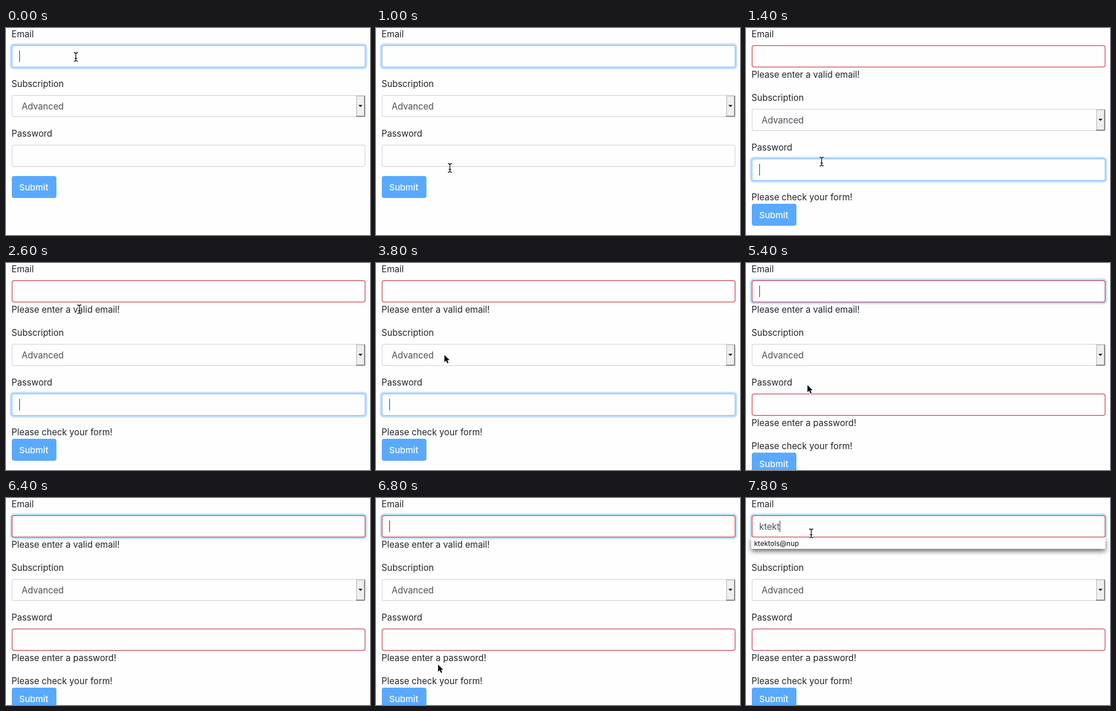
These frames come from a looping animation (628 px wide and 358 px high, 8000 ms). An HTML page with a canvas:

```html
<!DOCTYPE html>
<html lang="en">
<head>
<meta charset="utf-8">
<title>Form validation</title>
<style>
  html, body { margin: 0; width: 100%; height: 100%; overflow: hidden; background: #fefefe; }
  canvas { display: block; width: 628px; height: 358px; }
</style>
</head>
<body>
<canvas id="stage"></canvas>
<script>
const W = 628, H = 358, LOOP = 8000, STEP = 200;
const canvas = document.getElementById('stage');
const ctx = canvas.getContext('2d');
const ratio = window.devicePixelRatio || 1;
canvas.width = W * ratio;
canvas.height = H * ratio;

const FAMILY = 'Inter, "Open Sans", sans-serif';
const BODY = '15.2px ' + FAMILY;
const INK = '#212529', FIELD_INK = '#495057';
const GREY = '#cdd0d3', RED = '#bd2430', FOCUS = '#80bdff';

const EMAIL_BLUR = 1200, PASSWORD_BLUR = 4200, POPUP = 7200;
const TYPED = 'ktekt', SUGGESTION = 'ktektols@nup';
const KEYS = [7000, 7200, 7200, 7400, 7600];

// Pointer path: time, x, y
const PATH = [
  [0, 120, 50], [200, 120, 50], [1000, 127, 242], [1400, 130, 231], [2000, 130, 231],
  [2600, 126, 80], [2800, 124, 78], [3300, 112, 284], [3800, 118, 159],
  [4200, 116, 57], [4400, 115, 55], [5000, 115, 57], [5800, 96, 364], [6400, 96, 370],
  [6600, 104, 336], [7200, 116, 150], [7600, 112, 68], [7800, 112, 61], [8000, 112, 61]
];

const clamp = v => Math.max(0, Math.min(1, v));

function pointerAt(t) {
  let i = 0;
  while (i < PATH.length - 2 && t >= PATH[i + 1][0]) i++;
  const [t0, x0, y0] = PATH[i], [t1, x1, y1] = PATH[i + 1];
  let k = clamp((t - t0) / (t1 - t0));
  k = k * k * (3 - 2 * k);
  return [Math.round(x0 + (x1 - x0) * k), Math.round(y0 + (y1 - y0) * k)];
}

function text(str, x, y, color = INK, font = BODY) {
  ctx.font = font;
  ctx.fillStyle = color;
  ctx.fillText(str, x, y);
}

function roundBox(x, y, w, h, r, fill) {
  ctx.beginPath();
  ctx.roundRect(x, y, w, h, r);
  ctx.fillStyle = fill;
  ctx.fill();
}

function field(y, border, glow = 0) {
  if (glow > 0) {
    ctx.globalAlpha = glow;
    roundBox(6.8, y - 3.2, 616.4, 44.4, 7, '#bfdeff');
    ctx.globalAlpha = 1;
  }
  roundBox(10, y, 610, 38, 4, border);
  roundBox(11, y + 1, 608, 36, 3, '#fefefe');
}

function select(y) {
  field(y, GREY);
  text('Advanced', 27, y + 24.5, FIELD_INK);
  ctx.fillStyle = '#777';
  ctx.fillRect(604, y + 1, 15.5, 36.5);
  ctx.fillStyle = '#c9c9c9';
  ctx.fillRect(604, y + 1, 14, 35);
  ctx.fillStyle = '#efefef';
  ctx.fillRect(605.5, y + 2.5, 12, 33);
  ctx.fillStyle = '#111';
  ctx.beginPath();
  ctx.moveTo(608, y + 17);
  ctx.lineTo(615, y + 17);
  ctx.lineTo(611.5, y + 20.7);
  ctx.fill();
}

function button(y) {
  roundBox(10, y, 77, 38, 4, '#59a9ff');
  text('Submit', 22.8, y + 24.5, '#fff', '500 15px ' + FAMILY);
}

function caret(x, y, age) {
  if (age % 1134 >= 567) return;
  ctx.fillStyle = '#333';
  ctx.fillRect(x, y + 9, 1, 20);
}

function popup() {
  ctx.save();
  ctx.shadowColor = 'rgba(0,0,0,.6)';
  ctx.shadowBlur = 9 * ratio;
  ctx.shadowOffsetY = 4 * ratio;
  ctx.beginPath();
  ctx.rect(0, 68, W, 60);
  ctx.clip();
  ctx.fillStyle = '#fefefe';
  ctx.fillRect(9, 68, 611, 20);
  ctx.restore();
  text(SUGGESTION, 14, 83, '#111', '12px ' + FAMILY);
}

function beam(x, y) {
  ctx.beginPath();
  ctx.moveTo(x - 3, y - 7.5);
  ctx.quadraticCurveTo(x + .5, y - 7.5, x + .5, y - 5);
  ctx.quadraticCurveTo(x + .5, y - 7.5, x + 4, y - 7.5);
  ctx.moveTo(x + .5, y - 5);
  ctx.lineTo(x + .5, y + 5.5);
  ctx.moveTo(x - 3, y + 7.5);
  ctx.quadraticCurveTo(x + .5, y + 7.5, x + .5, y + 5);
  ctx.quadraticCurveTo(x + .5, y + 7.5, x + 4, y + 7.5);
  ctx.moveTo(x - 1.5, y + 2.5);
  ctx.lineTo(x + 2.5, y + 2.5);
  ctx.strokeStyle = '#fff';
  ctx.lineWidth = 3;
  ctx.stroke();
  ctx.strokeStyle = '#111';
  ctx.lineWidth = 1.3;
  ctx.stroke();
}

function arrow(x, y) {
  ctx.beginPath();
  [[0, 0], [0, 12.5], [2.9, 9.8], [5, 14.6], [7.2, 13.6], [5.1, 9], [9, 9]]
    .forEach(([dx, dy]) => ctx.lineTo(x + dx, y + dy));
  ctx.closePath();
  ctx.strokeStyle = '#fff';
  ctx.lineWidth = 2;
  ctx.stroke();
  ctx.fillStyle = '#0a0a0a';
  ctx.fill();
}

function draw(t) {
  const emailBad = t >= EMAIL_BLUR, passwordBad = t >= PASSWORD_BLUR;
  const shift = emailBad ? 24 : 0;
  const passwordY = 202 + shift;
  const onPassword = emailBad && !passwordBad;

  // Focus glow lags one step behind the click
  const fade = at => clamp((t - at + 100) / 200);
  const passwordGlow = emailBad ? fade(EMAIL_BLUR) * (passwordBad ? 1 - fade(PASSWORD_BLUR) : 1) : 0;
  const emailGlow = passwordBad ? fade(PASSWORD_BLUR) : emailBad ? 1 - fade(EMAIL_BLUR) : 1;

  ctx.setTransform(ratio, 0, 0, ratio, 0, 0);
  ctx.fillStyle = '#fefefe';
  ctx.fillRect(0, 0, W, H);

  text('Email', 9.5, 15.5);
  field(30, emailBad ? RED : FOCUS, emailGlow);
  if (emailBad) text('Please enter a valid email!', 9.5, 85.5);

  text('Subscription', 9.5, 101.5 + shift);
  select(116 + shift);

  text('Password', 9.5, 187.5 + shift);
  field(passwordY, passwordBad ? RED : onPassword ? FOCUS : GREY, passwordGlow);

  let y = 256 + shift;
  if (passwordBad) {
    text('Please enter a password!', 9.5, 281.5);
    y += 24;
  }
  if (emailBad) {
    text('Please check your form!', 9.5, y + 17.5);
    y += 24;
  }
  button(y);

  const pressed = KEYS.filter(k => k <= t);
  const typed = TYPED.slice(0, pressed.length);
  if (onPassword) {
    caret(23, passwordY, t - EMAIL_BLUR);
  } else {
    text(typed, 22.8, 54.5, FIELD_INK);
    const since = pressed.length ? pressed[pressed.length - 1] : passwordBad ? PASSWORD_BLUR : 0;
    caret(23 + Math.round(ctx.measureText(typed).width), 30, t - since);
  }
  if (t >= POPUP) popup();

  const [px, py] = pointerAt(t);
  const inside = top => py >= top && py <= top + 41;
  const overText = emailBad && py > 70 && py < 90 && px < 198 && t < POPUP;
  (inside(30) || inside(passwordY) || overText ? beam : arrow)(px, py);
}

const start = performance.now();
function tick() {
  const t = (performance.now() - start) % LOOP;
  draw(Math.floor(t / STEP) * STEP);
  requestAnimationFrame(tick);
}
tick();
</script>
</body>
</html>
```
